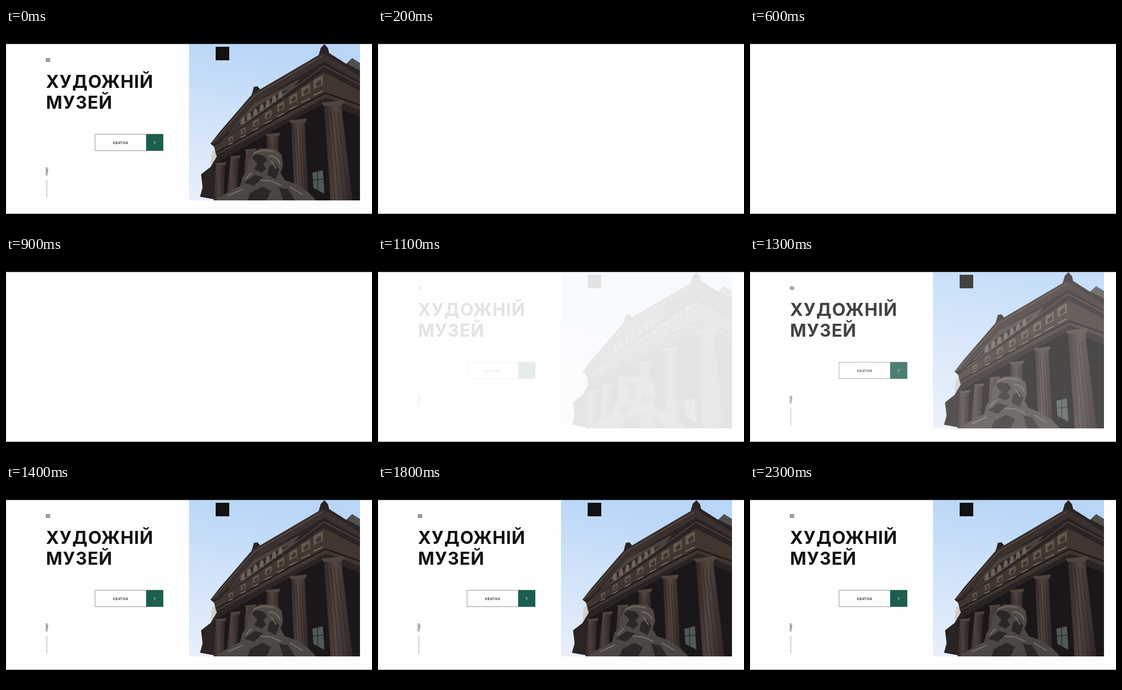
Recreate the animation shown at these times as an HTML page. Size 700x384 px, loop 2.8 s.

```html
<!DOCTYPE html>
<html lang="uk">
<head>
<meta charset="utf-8">
<style>
  html, body { margin: 0; width: 100%; height: 100%; overflow: hidden; background: #000; }
  svg { display: block; width: 700px; height: 384px; font-family: Inter, "Open Sans", sans-serif; fill: #111; }
  .title { font-size: 33.5px; font-weight: 700; letter-spacing: 1.1px; }
  .label { font-size: 8px; letter-spacing: .5px; text-anchor: middle; }
  .side { font-size: 6.5px; }
</style>
</head>
<body>
<svg viewBox="0 0 700 384">
  <defs>
    <linearGradient id="sky" x1=".3" y1="0" x2=".1" y2="1">
      <stop offset="0" stop-color="#b8d6f7"/>
      <stop offset=".4" stop-color="#cde1f9"/>
      <stop offset="1" stop-color="#e8effa"/>
    </linearGradient>
    <linearGradient id="stone">
      <stop offset="0" stop-color="#2f2625"/>
      <stop offset=".4" stop-color="#524540"/>
      <stop offset="1" stop-color="#2b2323"/>
    </linearGradient>
    <linearGradient id="statue" x1="0" y1="0" x2=".3" y2="1">
      <stop offset="0" stop-color="#514a45"/>
      <stop offset="1" stop-color="#4b4643"/>
    </linearGradient>
    <clipPath id="frame"><path d="M350 31H677V331H350Z"/></clipPath>
  </defs>

  <rect y="30.700" width="700" height="326" fill="#fefefe"/>
  <path d="M.5 31V357" stroke="#e6e3e6"/>

  <g id="page">
    <path d="M76 59h8.500M76 61.300h8.500M76 63.600h8.500" stroke="#222" stroke-width="1.100"/>
    <text class="title" x="76.500" y="115">ХУДОЖНІЙ</text>
    <text class="title" x="76.500" y="155">МУЗЕЙ</text>

    <rect x="170.300" y="204" width="130" height="31.500" fill="none" stroke="#8b9497"/>
    <rect x="268" y="203.700" width="32.800" height="32" fill="#1c5e4f"/>
    <path d="M283 217l2.500 2.800l-2.500 2.800" fill="none" stroke="#fff"/>
    <text class="label" x="219.300" y="222.500">квитки</text>

    <text class="side" transform="translate(80.200 283) rotate(-90)">події</text>
    <path d="M78 292V325" stroke="#8e989d" stroke-width=".9"/>

    <g clip-path="url(#frame)">
      <rect x="350" y="31" width="327" height="300" fill="url(#sky)"/>
      <path fill="#d3cecd" d="M392 251L394 236L403 235V256L392 262Z"/>
      <path fill="#2a2323" d="M371 324L376 306L373 281L391 267L403 247V232L391 222L409 199L470 128L474 113L481 112L486 118L598 52L602 38L609 31L616 39L618 48L651 69L662 58L677 68V331H410Z"/>
      <path fill="#3a302e" d="M392 222L472 127L486 118L607 48L677 93V103L608 64L484 139L405 219Z"/>
      <path fill="#4c413b" d="M424 203L477 143L562 98L548 117L470 174Z"/>
      <path fill="#2d2525" d="M431 197L479 151L541 116L527 129L469 171Z"/>
      <path fill="#41352f" d="M398 228L608 85L677 121V157L612 133L545 169L402 245Z"/>
      <path fill="none" stroke="#75675e" d="M394 221L475 130L606 53M414 215L608 73L677 109"/>
      <path fill="none" stroke="#211a1b" stroke-width="3" d="M403 239L545 159L611 125L677 148"/>
      <path fill="#1b1718" d="M404 258L545 178L608 145L677 170V331H404Z"/>
      <path fill="#514f4e" d="M651 68L662 58L677 67V82Z"/>
      <g id="reliefs"></g>
      <g id="columns"></g>
      <path fill="#505955" d="M586 278L606 273L609 318L588 307Z"/>
      <path fill="none" stroke="#25282a" stroke-width="1.500" d="M596 275V313M587 292L608 290"/>
      <path fill="url(#statue)" d="M400 331L414 321L448 303L452 286L462 274L465 254L472 238L488 231L514 232L527 243L530 264L525 278L533 292L553 299L578 315L593 331Z"/>
      <path fill="#2b2726" d="M470 249L477 242L493 245L500 254L492 262L498 270L489 278L474 271L481 261ZM503 266L514 260L523 272L516 290L500 282ZM455 297L476 282L492 287L474 303ZM468 316L490 305L507 313L498 331H461ZM522 306L540 310L553 331H530Z"/>
      <path fill="none" stroke="#7a7169" stroke-width="2" d="M474 241Q490 231 513 238M503 246Q519 246 524 260M507 255L517 270M470 277L458 290M486 292L508 294L526 302M425 322L453 309M543 305L568 320"/>
    </g>
    <rect x="401" y="36" width="26" height="26"/>
  </g>
</svg>
<script>
const el = id => document.getElementById(id);
const shape = (d, fill) => `<path d="${d}" fill="${fill}"/>`;
const line = (d, color, width) => `<path d="${d}" stroke="${color}" stroke-width="${width}"/>`;

// Tapered shaft with a capital and flutes, running to the photo's lower edge.
function column(x, y, width, footX, footWidth) {
  const cap = width * .14;
  let art = shape(`M${x} ${y}h${width}L${footX + footWidth} 331h${-footWidth}Z`, 'url(#stone)');
  for (let k = .2; k < 1; k += .2)
    art += line(`M${x + width * k} ${y + cap * 3}L${footX + footWidth * k} 331`, '#2f2625', width * .035);
  return art + shape(`M${x - cap} ${y - cap}l${width + cap * 2} ${-cap}v${cap}l${-cap} ${cap * 1.4}h${-width}Z`, '#50443e');
}

el('columns').innerHTML = [
  [402, 262, 17, 397, 19], [430, 249, 16, 421, 19], [459, 236, 17, 452, 20],
  [499, 207, 22, 498, 26], [545, 181, 26, 552, 27], [608, 148, 33, 621, 42]
].map(c => column(...c)).join('');

let reliefs = '';
for (let i = 0; i < 8; i++) {
  const k = i / 7, x = 430 + 167 * k, y = 214 - 107 * k, s = 4 + 5 * k;
  reliefs += shape(`M${x - s} ${y - s * .8}l${s * 2} ${-s}v${s * 2}l${-s * 2} ${s}Z`, '#65594e')
    + shape(`M${x - s * .5} ${y}l${s} ${-s}l${s * .2} ${s}l${-s} ${s * .7}Z`, '#3b312d')
    + line(`M${x - s} ${y + s * 2.5}l${s * 2} ${-s}`, '#85786d', 1.5);
}
for (let i = 0; i < 7; i++) {
  const x = 452 + i * 12, y = 179 - i * 8.3;
  reliefs += shape(`M${x - 4} ${y + 6}l2 -11l4 -4l3 5l-1 9Z`, '#6d635c');
}
el('reliefs').innerHTML = reliefs;

const LOOP = 2800, STEP = 100;

function opacityAt(t) {
  if (t < 100) return 1;
  if (t < 200) return .3;
  const u = Math.min(1, Math.max(0, (t - 1015) / 405));
  return u * u * (3 - 2 * u);
}

const start = performance.now();
function draw() {
  const t = (performance.now() - start) % LOOP;
  el('page').setAttribute('opacity', opacityAt(Math.floor(t / STEP) * STEP));
  requestAnimationFrame(draw);
}
draw();
</script>
</body>
</html>
```
